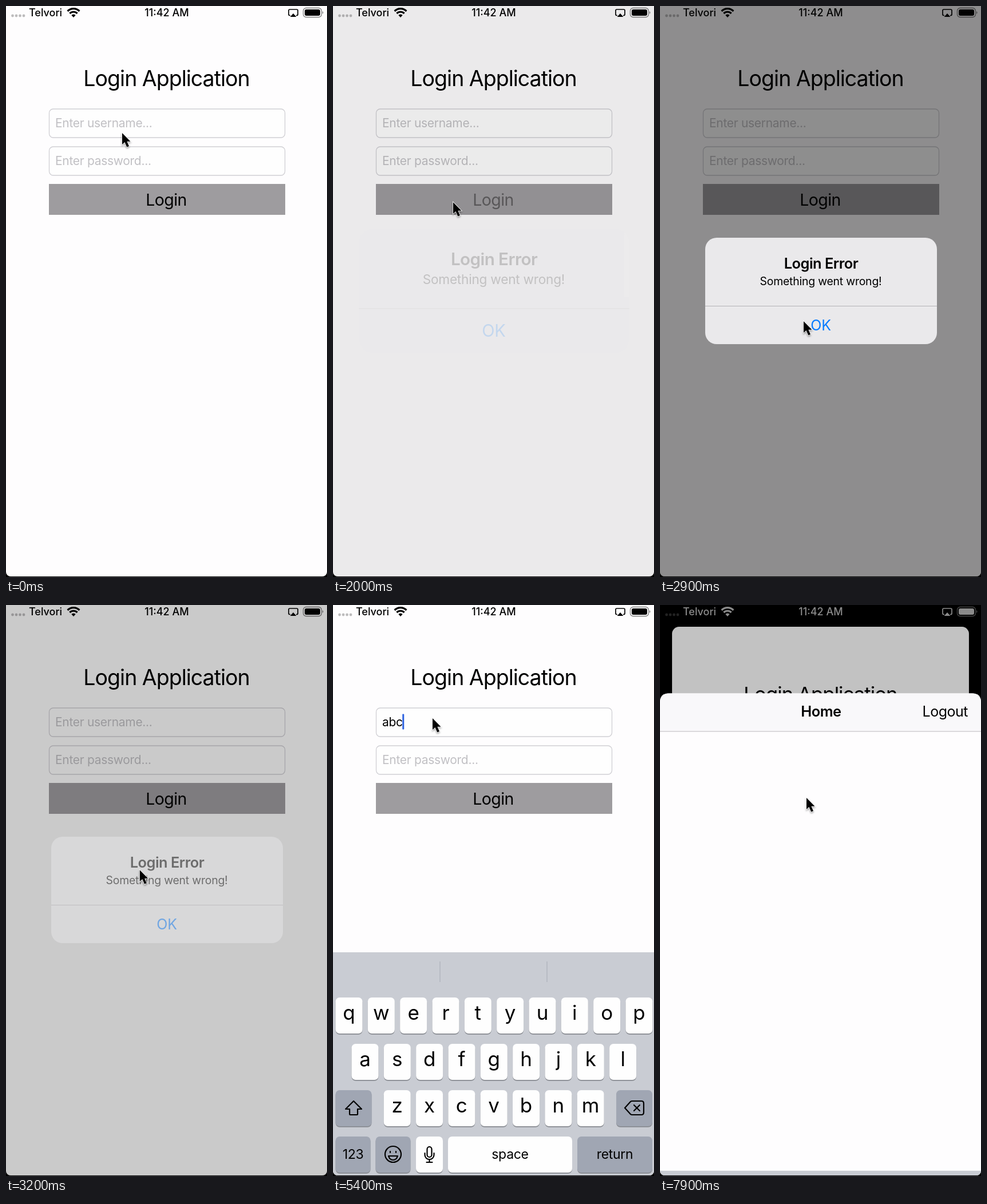
An HTML page that plays this animation: 561 by 998 pixels, repeating every 8 s.

```html
<!DOCTYPE html>
<html lang="en">
<head>
<meta charset="utf-8">
<title>Login</title>
<style>
html, body { margin: 0; width: 100%; height: 100%; overflow: hidden; background: #000; }
svg { display: block; width: 561px; height: 997px; overflow: hidden; border-radius: 0 0 8px 8px; }
text { font-family: Inter, "Liberation Sans", sans-serif; font-size: 21px; letter-spacing: -.3px; white-space: pre; }
.mid { text-anchor: middle; }
.field { fill: #fefefe; stroke: #d0cfd4; stroke-width: 1.3; }
.hint { fill: #c1c0c4; }
.head { font-size: 25.4px; font-weight: 600; letter-spacing: -.5px; }
.status text { font-size: 18px; font-weight: 500; letter-spacing: 0; }
.line { fill: none; stroke: currentColor; }
.char { font-size: 35px; letter-spacing: 0; }
.word { font-size: 23px; }
.icon { fill: none; stroke: #000; stroke-width: 2.2; stroke-linejoin: round; stroke-linecap: round; }
</style>
</head>
<body>
<svg>
  <rect width="561" height="998"/>
  <g id="card">
    <rect id="page" width="561" height="998" fill="#fefdfe"/>
    <text class="mid" x="280.5" y="140" style="font-size:37.5px;letter-spacing:-1px">Login Application</text>
    <rect class="field" x="75.5" y="180" width="412" height="50" rx="7"/>
    <rect class="field" x="75.5" y="246" width="412" height="50" rx="7"/>
    <text class="hint" id="userHint" x="86" y="212">Enter username...</text>
    <text class="hint" id="passHint" x="86" y="278">Enter password...</text>
    <text id="user" x="86" y="212"></text>
    <g id="dots"></g>
    <text id="pass" y="278"></text>
    <rect id="caret" width="3" height="27" rx="1" fill="#2f63e0"/>
    <rect x="75" y="311" width="413" height="54" fill="#9e9c9f"/>
    <text class="mid" id="login" x="280" y="349" style="font-size:28.5px;letter-spacing:-.6px">Login</text>
    <rect id="shade" width="561" height="998"/>
  </g>

  <g class="status" id="status" fill="currentColor">
    <g opacity=".25">
      <circle cx="11.5" cy="17" r="2.4"/><circle cx="18" cy="17" r="2.4"/>
      <circle cx="24.5" cy="17" r="2.4"/><circle cx="31" cy="17" r="2.4"/>
    </g>
    <text x="40" y="18">Telvori</text>
    <path d="M118 20l-3.7-3.9a5.2 5.2 0 0 1 7.4 0z"/>
    <path class="line" stroke-width="3.2" d="M111.4 13a9.3 9.3 0 0 1 13.2 0M107.6 9a14.7 14.7 0 0 1 20.8 0"/>
    <text class="mid" x="281" y="18">11:42 AM</text>
    <path class="line" stroke-width="1.7" d="M497 16.5h-1a2 2 0 0 1-2-2v-6.500a2 2 0 0 1 2-2h12a2 2 0 0 1 2 2v6.500a2 2 0 0 1-2 2h-1"/>
    <path d="M502 13l5.500 6h-11z"/>
    <rect class="line" x="519.500" y="3.500" width="32" height="16" rx="5" stroke-width="1.300" opacity=".5"/>
    <rect x="522" y="6" width="27" height="11" rx="3"/>
    <path d="M553 9q3 2.500 0 5z" opacity=".5"/>
  </g>

  <g id="sheet">
    <rect width="561" height="1010" rx="15" fill="#fefdfe"/>
    <path d="M0 66V15Q0 0 15 0H546Q561 0 561 15V66z" fill="#f9f8fa"/>
    <path d="M0 66.500H561" stroke="#b8b7ba"/>
    <text class="mid head" x="281.500" y="41">Home</text>
    <text x="538" y="41" text-anchor="end" style="font-size:25px;letter-spacing:-.5px">Logout</text>
  </g>

  <rect id="dim" width="561" height="998"/>
  <g id="alert">
    <rect x="79" y="405" width="405" height="186" rx="20" fill="#eae9eb"/>
    <path d="M79 524.500H484" stroke="#b3b2b5" stroke-width="1.200"/>
    <text class="mid head" x="281.500" y="459">Login Error</text>
    <text class="mid" x="281" y="488" style="font-size:19.400px;letter-spacing:-.2px">Something went wrong!</text>
    <text class="mid" x="281" y="567" fill="#087cff" style="font-size:25px">OK</text>
  </g>

  <g id="board"></g>

  <path id="mouse" d="M0 0V20L4.500 16 8.200 24.500 12 22.900 8.400 14.700H14.500z" stroke="#fff" stroke-width="1.600"
    paint-order="stroke" style="filter:drop-shadow(0 2px 1.500px rgba(0,0,0,.35))"/>
</svg>
<script>
const $ = id => document.getElementById(id);
const set = (id, attrs) => { for (const k in attrs) $(id).setAttribute(k, attrs[k]); };
const show = (id, on) => set(id, { visibility: on ? 'visible' : 'hidden' });
const clamp = v => Math.max(0, Math.min(1, v));

// critically damped approach from 0 to 1
function spring(t, start, rate) {
  const x = Math.max(0, t - start) / 1000 * rate;
  return 1 - (1 + x) * Math.exp(-x);
}

function buildBoard() {
  const key = (x, y, w, label, dark, cls = 'word', base = 39) =>
    `<rect x="${x}" y="${y + 1.8}" width="${w}" height="63" rx="7" fill="#888b91"/>
     <rect x="${x}" y="${y}" width="${w}" height="63" rx="7" fill="${dark ? '#a0a6b3' : '#fefefe'}"/>
     <text class="mid ${cls}" x="${x + w / 2}" y="${y + base}">${label}</text>`;
  const icon = (x, y, d) => `<path class="icon" transform="translate(${x} ${y})" d="${d}"/>`;
  const row = (chars, x, y) =>
    [...chars].map((c, i) => key(x + i * 56.33, y, 47, c, false, 'char')).join('');
  $('board').innerHTML =
    `<rect id="back" width="561" height="400" fill="#c9ccd3"/>
     <path id="bars" d="M187 623v36M374 623v36" stroke="#afb3bb" stroke-width="1.3"/>` +
    row('qwertyuiop', 4.5, 686) + row('asdfghjkl', 32.5, 767) + row('zxcvbnm', 88.7, 848) +
    key(4.5, 848, 63, '', true) + key(495, 848, 63, '', true) +
    icon(36, 879, 'M0-12L14 2H7V11Q7 12 6 12H-6Q-7 12-7 11V2H-14z') +
    icon(526, 879, 'M-16 0L-6-11Q-5-12-3-12H13Q17-12 17-8V8Q17 12 13 12H-3Q-5 12-6 11zM0-5L10 5M10-5L0 5') +
    key(427, 929, 131, 'return', true) +
    '<g id="plainRow">' +
      key(4.5, 929, 61, '123', true) + key(74.5, 929, 61, '', true) +
      key(145, 929, 47, '', false) + key(201, 929, 217, 'space', false) +
      icon(105, 960, 'M-14 0A14 14 0 1 1 14 0A14 14 0 1 1-14 0M-5-5v2M5-5v2M-8 3H8Q6 10 0 10T-8 3') +
      icon(168.5, 960, 'M-4-9A4 4 0 0 1 4-9V1A4 4 0 0 1-4 1zM-8-2V1A8 8 0 0 0 8 1V-2M0 9V14M-5 14H5') +
    '</g><g id="secureRow">' +
      key(4.5, 929, 131, '.?123', true) + key(144, 929, 274, 'space', false) + '</g>';
}

// time, x, y
const path = [
  [450, 203, 222], [900, 202, 273], [1250, 204, 290], [1750, 210, 343], [2100, 210, 343],
  [2600, 246, 545], [2750, 246, 545], [2900, 251, 551], [3100, 254, 553], [3500, 174, 198],
  [5550, 174, 198], [5750, 180, 262], [6850, 180, 262], [7100, 215, 297], [7450, 256, 337]
];
function mouseAt(t) {
  const i = path.findIndex(p => p[0] > t);
  if (i <= 0) return i ? path[path.length - 1].slice(1) : path[0].slice(1);
  const a = path[i - 1], b = path[i];
  const f = (t - a[0]) / (b[0] - a[0]);
  return [a[1] + (b[1] - a[1]) * f, a[2] + (b[2] - a[2]) * f];
}

const typed = (t, times) => 'abc'.slice(0, times.filter(s => t >= s).length);

// button label fades at once on press and returns slowly
function pressed(t, down, up) {
  return t < down ? 1 : .2 + .8 * clamp((t - up) / 450);
}

function drawFields(t) {
  const secure = t >= 5800;
  const user = typed(t, [5000, 5200, 5400]), pass = typed(t, [6500, 6600, 6900]);
  const hidden = Math.max(0, pass.length - 1);
  $('user').textContent = user;
  $('pass').textContent = pass.slice(-1);
  set('pass', { x: 86 + 12.5 * hidden });
  $('dots').innerHTML = [...Array(hidden)].map((_, i) =>
    `<circle cx="${92 + 12.5 * i}" cy="270.500" r="5.400"/>`).join('');
  show('userHint', !user);
  show('passHint', !pass);

  const end = secure
    ? 12.5 * hidden + (pass ? $('pass').getComputedTextLength() : 0)
    : user ? $('user').getComputedTextLength() : 0;
  show('caret', (t >= 500 && t < 930) || (t >= 3895 && t < 7640));
  set('caret', { x: 85.5 + end, y: secure ? 256.5 : 190.5 });
  set('login', { opacity: t < 4000 ? pressed(t, 1700, 1890) : pressed(t, 7470, 7600) });
}

function drawBoard(t) {
  const secure = t >= 5800;
  let y = 391;
  if (t >= 7643) y = 324 * spring(t, 7643, 21);
  else if (t >= 3895) y = 391 * (1 - spring(t, 3895, 21));
  else if (t >= 910) y = 391 * spring(t, 910, 21);
  else y = 391 * (1 - spring(t, 510, 21));
  set('board', { transform: `translate(0 ${y})` });
  set('back', { y: secure ? 674 : 607 });
  show('bars', !secure);
  show('plainRow', !secure);
  show('secureRow', secure);
}

function drawAlert(t) {
  const enter = spring(t, 1940, 12), leave = spring(t, 3080, 15);
  const p = enter * (1 - leave), s = 1.2 - .2 * enter;
  set('dim', { opacity: .445 * p });
  set('alert', { opacity: p, transform: `translate(281.5 498) scale(${s}) translate(-281.5 -498)` });
}

function drawSheet(t) {
  const p = spring(t, 7650, 14.8), s = 1 - .085 * p;
  set('card', { transform: `translate(${280.5 * (1 - s)} ${43 * p}) scale(${s})` });
  set('page', { rx: 15 * p });
  set('shade', { rx: 15 * p, opacity: .265 * p });
  set('sheet', { transform: `translate(0 ${998 - 953 * p})` });
  const grey = Math.round(255 * p ** 5);
  $('status').style.color = `rgb(${grey},${grey},${grey})`;
}

function draw(now) {
  const t = now % 8000;
  drawFields(t);
  drawBoard(t);
  drawAlert(t);
  drawSheet(t);
  set('mouse', { transform: `translate(${mouseAt(t)})` });
  requestAnimationFrame(draw);
}

buildBoard();
draw(0);
</script>
</body>
</html>
```
